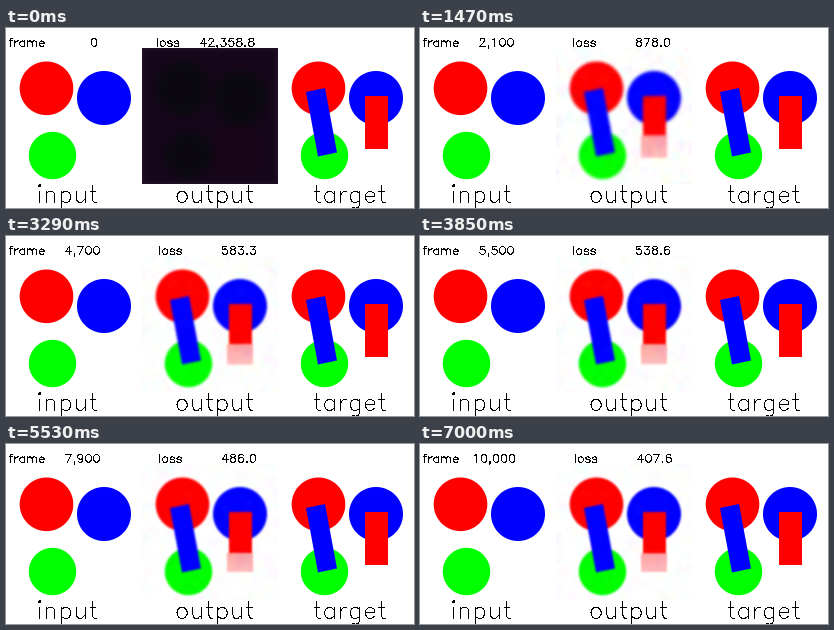
These frames come from a looping animation (408 px wide and 180 px high, 7.07 s). A matplotlib script:

```python
import numpy as np
import matplotlib.pyplot as plt
from matplotlib.animation import FuncAnimation

W, H, S, TOP = 408, 180, 136, 20
FRAMES, STEP_MS = 101, 70
RED, GREEN, BLUE = np.eye(3)

# ---- single-stroke lettering -------------------------------------------


def arc(cx, cy, rx, ry, a0, a1):
    n = max(3, round(abs(a1 - a0) / 26))
    t = np.radians(np.linspace(a0, a1, n + 1))
    return list(zip(cx + rx * np.cos(t), cy + ry * np.sin(t)))


def hook(dx):
    return [(4 + dx, 10)] + arc(9.5 + dx, 9, 5.5, 5, 150, 0) + [(15 + dx, 0)]


SIX = arc(10.5, 13, 6.5, 8, 40, 180) + arc(10.5, 6.5, 6.5, 6.5, 180, 540)
NINE = [(20 - x, 21 - y) for x, y in SIX]
BOWL = arc(9.5, 7, 6.5, 7, 33, 327)
STEM = [(4, 14), (4, 0)]
RSTEM = [(15, 14), (15, 0)]
BAR = [(2, 14), (9, 14)]

# character: (advance, strokes)
GLYPHS = {
    " ": (16, []),
    "a": (19, [RSTEM, BOWL]),
    "e": (18, [[(3, 8), (15, 8)] + arc(9.25, 7, 6.25, 7, 20, 325)]),
    "f": (12, [[(10, 21)] + arc(9, 17, 4, 4, 90, 180) + [(5, 0)], BAR]),
    "g": (19, [[(15, 14)] + arc(9.5, -2, 5.5, 5, 0, -130), BOWL]),
    "i": (8, [arc(4, 21, 1, 1, 0, 360), STEM]),
    "l": (8, [[(4, 21), (4, 0)]]),
    "m": (30, [STEM, hook(0), hook(11)]),
    "n": (19, [STEM, hook(0)]),
    "o": (19, [arc(9.5, 7, 6.5, 7, 0, 360)]),
    "p": (19, [[(4, 14), (4, -7)], arc(9.5, 7, 6.5, 7, 147, -147)]),
    "r": (13, [STEM, arc(11, 8, 7, 6, 180, 90) + [(12, 14)]]),
    "s": (17, [[(14, 11), (13, 13), (10, 14), (7, 14), (4, 13), (3, 11), (4, 9),
                (6, 8), (11, 7), (13, 6), (14, 4), (14, 3), (13, 1), (10, 0),
                (7, 0), (4, 1), (3, 3)]]),
    "t": (12, [[(5, 21)] + arc(9, 4, 4, 4, 180, 270) + [(10, 0)], BAR]),
    "u": (19, [[(4, 14)] + arc(8.5, 4.5, 4.5, 4.5, 180, 300) + [(15, 4)], RSTEM]),
    "0": (20, [arc(10, 10.5, 7, 10.5, 0, 360)]),
    "1": (20, [[(6, 17), (8, 18), (11, 21), (11, 0)]]),
    "2": (20, [arc(10, 16, 6, 5, 180, -35) + [(3, 0), (17, 0)]]),
    "3": (20, [[(5, 21), (16, 21), (10, 13)] + arc(10, 6.5, 7, 6.5, 90, -157)]),
    "4": (20, [[(13, 0), (13, 21), (3, 7), (18, 7)]]),
    "5": (20, [[(15, 21), (5, 21), (4, 12)] + arc(10, 7, 7, 7, 135, -155)]),
    "6": (20, [SIX]),
    "7": (20, [[(3, 21), (17, 21), (7, 0)]]),
    "8": (20, [arc(10, 16.75, 6, 4.25, 0, 360), arc(10, 6.25, 7, 6.25, 0, 360)]),
    "9": (20, [NINE]),
    ",": (10, [arc(5, 1, 1, 1, 0, 360) + [(6, -1), (4, -4)]]),
    ".": (10, [arc(5, 1, 1, 1, 0, 360)]),
}


def write(img, text, x, base, scale):
    """Aliased one-pixel strokes."""
    for ch in text:
        adv, strokes = GLYPHS[ch]
        for stroke in strokes:
            pts = np.array(stroke) * (scale, -scale) + (x, base)
            for p, q in zip(pts, pts[1:]):
                n = int(np.ceil(np.abs(q - p).max())) + 1
                px, py = np.rint(np.linspace(p, q, n + 1)).astype(int).T
                ok = (px >= 0) & (px < W) & (py >= 0) & (py < H)
                img[py[ok], px[ok]] = 0
        x += adv * scale


# ---- shapes -------------------------------------------------------------

Y, X = np.mgrid[0:S, 0:S] + 0.5


def disc(cx, cy, r):
    return np.clip(r + 0.5 - np.hypot(X - cx, Y - cy), 0, 1)


def quad(*pts):
    """Antialiased convex polygon, corners clockwise on screen."""
    inside = np.full((S, S), 1e3)
    for (x0, y0), (x1, y1) in zip(pts, pts[1:] + pts[:1]):
        d = ((x1 - x0) * (Y - y0) - (y1 - y0) * (X - x0)) / np.hypot(x1 - x0, y1 - y0)
        inside = np.minimum(inside, d)
    return np.clip(inside + 0.5, 0, 1)


def box(x0, y0, x1, y1):
    return quad((x0, y0), (x1, y0), (x1, y1), (x0, y1))


def paint(img, mask, color):
    return img + mask[..., None] * (color - img)


DISCS = [(disc(40.5, 40.3, 26.8), RED), (disc(98, 50, 27), BLUE),
         (disc(46.5, 107.5, 23.7), GREEN)]
LINK = quad((28, 44), (47, 40), (59, 104.5), (40, 108.5))

scene = np.ones((S, S, 3))
for m, c in DISCS:
    scene = paint(scene, m, c)
goal = paint(paint(scene, LINK, BLUE), box(87, 48, 110, 101), RED)

# ---- network output -----------------------------------------------------


def blur(img, sigma):
    d = np.arange(S)
    g = np.exp(-((d[:, None] - d) ** 2) / (2 * sigma ** 2))
    g /= g.sum(1, keepdims=True)
    return np.stack([g @ img[..., c] @ g.T for c in range(3)], -1)


def speckle(seed, sigma):
    n = blur(np.random.default_rng(seed).normal(size=(S, S, 3)), sigma)
    return n / n.std()


STILL = speckle(500, 3.5)

edge = np.minimum(np.minimum(X, S - X), np.minimum(Y, S - Y))
dark = np.ones((S, S, 3)) * (0.085, 0.025, 0.1)
for m, _ in DISCS:
    dark = paint(dark, 0.75 * m, np.array([0.03, 0.04, 0.05]))
dark = paint(dark, 0.5 * box(72, 80, 115, 125), np.array([0.1, 0.01, 0.07]))
dark = blur(dark, 4)
dark += 0.05 * np.exp(-edge / 2.5)[..., None]
dark += 0.008 * (np.cos(np.pi * X / 2) * np.cos(np.pi * Y / 2))[..., None]


def output(k):
    if k == 0:
        return np.clip(dark, 0, 1)
    light, bars = 1 - np.exp(-k), 1 - np.exp(-k / 2.6)
    foot = 87 + 2.5 * k / 100
    img = paint(scene, bars * LINK, BLUE)
    img = paint(img, bars * box(87, 48, 110, foot), RED)
    fade = np.clip(1.15 - (0.1 + 0.3 * min(k / 34, 1)) * (Y - foot) / 22, 0, 1.2)
    ghost = box(85, foot, 111, 111 - 3 * min(k / 60, 1))
    img = paint(img, 0.34 * bars * fade * ghost, np.array([0.97, 0.06, 0.08]))
    img = blur(img, 0.8 + 4.5 / (1 + 0.25 * k))
    img += (0.008 + 0.2 / (k + 5)) * (0.7 * STILL + 0.7 * speckle(k, 2.2))
    return np.clip(dark * (1 - light) + light * img, 0, 1)


# ---- animation ----------------------------------------------------------

LOSS = [(0, 42358.8), (1, 6120), (2, 3340), (9, 1307.3), (34, 694.5),
        (47, 583.3), (64, 498.7), (79, 486.0), (100, 407.6)]


def loss(k):
    ks, vals = np.array(LOSS).T
    return np.exp(np.interp(np.log1p(k), np.log1p(ks), np.log(vals)))


base = np.ones((H, W, 3))
base[TOP:TOP + S, :S] = scene
base[TOP:TOP + S, 2 * S:] = goal
for i, word in enumerate(("input", "output", "target")):
    write(base, word, 30 + 138 * i, 174, 0.8)

fig = plt.figure(figsize=(W / 100, H / 100), dpi=100)
ax = fig.add_axes([0, 0, 1, 1])
ax.axis("off")
view = ax.imshow(base, interpolation="nearest", aspect="auto")


def draw(i):
    k = i - (i in (31, 62))  # two held steps
    img = base.copy()
    img[TOP:TOP + S, S:2 * S] = output(k)
    write(img, f"frame{100 * k:>8,d}{' ' * 9}loss{loss(k):>11,.1f}", 2, 18, 0.4)
    view.set_data(img)
    return [view]


anim = FuncAnimation(fig, draw, frames=FRAMES, interval=STEP_MS,
                     repeat=True, repeat_delay=0, blit=False)
plt.show()
```
